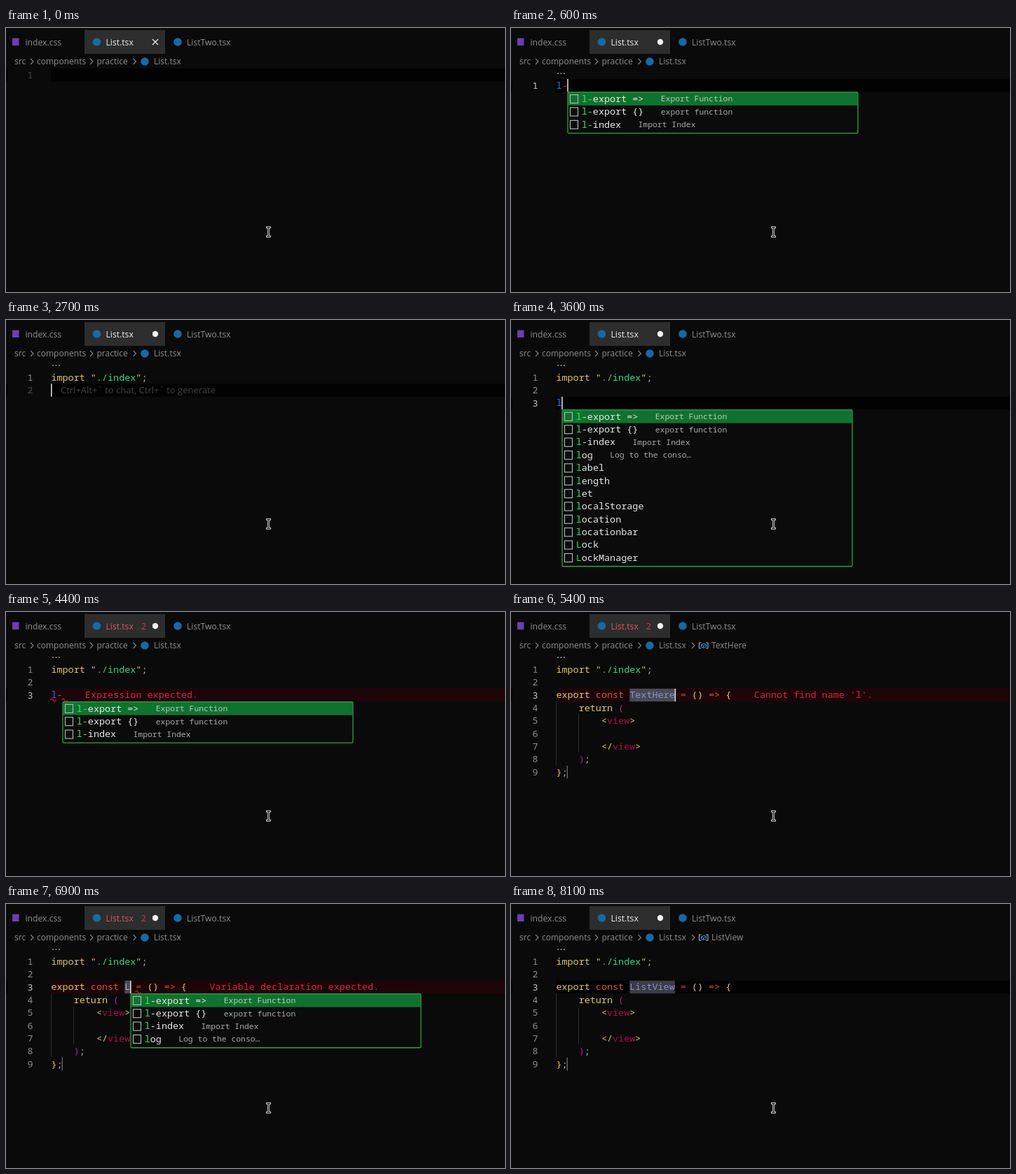
An HTML page that plays this animation: 712x378 px, repeating every 8200 ms.

```html
<!DOCTYPE html>
<html lang="en">
<head>
<meta charset="utf-8">
<title>Snippet typing</title>
<style>
  html, body { margin: 0; width: 100%; height: 100%; overflow: hidden; background: #0a0a0a; }
  svg { display: block; width: 712px; height: 378px; }
  text { white-space: pre; font: 12px "Open Sans", "Noto Sans", sans-serif; }
  .tab { font-size: 12.2px; }
  .code { font: 500 13.45px "Noto Sans Mono", "DejaVu Sans Mono", monospace; }
  .detail { font: 11.4px "Noto Sans Mono", "DejaVu Sans Mono", monospace; }
  .hint { font-size: 13px; }
</style>
</head>
<body>
<svg viewBox="0 0 712 378">
  <rect width="712" height="378" fill="#0a0a0a"/>
  <rect x="112" y="3" width="115" height="34" fill="#2d2d2d"/>
  <rect x="9" y="14.5" width="9.5" height="10.5" fill="#6a3fb0"/>
  <g fill="#1769a5">
    <circle cx="129.5" cy="20" r="5.8"/>
    <circle cx="245" cy="20" r="5.8"/>
    <circle cx="198" cy="48" r="5.8"/>
  </g>
  <g fill="#8f8f8f">
    <text x="27.5" y="24.5" class="tab">index.css</text>
    <text x="258" y="24.5" class="tab">ListTwo.tsx</text>
    <text x="12" y="52.3">src</text>
    <text x="44" y="52.3">components</text>
    <text x="129.5" y="52.3">practice</text>
    <text x="211" y="52.3">List.tsx</text>
  </g>
  <path d="M35 44l4 4-4 4M120 44l4 4-4 4M181.500 44l4 4-4 4" fill="none" stroke="#858585" stroke-width="1.1"/>
  <g id="editor"></g>
  <g fill="none">
    <path d="M371 285.500h7M374.500 285.500v13M371 298.500h7" stroke="#bdbdbd" stroke-width="3"/>
    <path d="M372 285.500h5M374.500 285.500v13M372 298.500h5" stroke="#1c1c1c"/>
  </g>
</svg>
<script>
const LOOP = 8200, LEFT = 64.4, CHAR = 8.07, ROW = 18.375;
const editor = document.getElementById('editor');

const COLORS = {
  y: '#dfc674', g: '#39d583', r: '#cf4038', o: '#d0573a', n: '#8d8bd2', b: '#3a70d2',
  m: '#a3248c', v: '#a90f49', w: '#b5b5a8', l: '#a8aaa4'
};

// Lines are lists of "colour:text" tokens.
const IMPORT = ['y:import "', 'g:./index', 'y:"', 'w:;'];
const BODY = [
  ['y:    return ', 'm:('],
  ['y:        <', 'v:view', 'y:>'],
  [],
  ['y:        </', 'v:view', 'y:>'],
  ['m:    )', 'w:;'],
  ['y:}', 'w:;']
];
const component = (name, color = 'n') => [
  IMPORT, [],
  ['y:export ', 'o:const ', color + ':' + name, 'r: = ', 'y:() ', 'o:=> ', 'y:{'],
  ...BODY
];

const SNIPPETS = [['l-export =>', 'Export Function'], ['l-export {}', 'export function'], ['l-index', 'Import Index']];
const LOG = ['log', 'Log to the conso…'];
const ALL = [...SNIPPETS, LOG, ...['label', 'length', 'let', 'localStorage', 'location', 'locationbar', 'Lock', 'LockManager'].map(s => [s, ''])];
const INDEX = [SNIPPETS[2]];
const EXPR = 'Expression expected.', CANNOT = "Cannot find name 'l'.", DECL = 'Variable declaration expected.';

const named = (name, extra) => ({ code: component(name), col: 13 + name.length, word: name.length, ...extra });

// Each entry changes part of the editor state from its time on.
const EVENTS = [
  [0, { code: [[]], line: 0, col: 0, caret: 0, lens: 0, dirty: 0, hint: 0, error: '', list: null, match: 0, word: 0, crumb: '', stop: 0, squiggles: [] }],
  [100, { caret: 1, hint: 1 }],
  [300, { code: [['b:l']], col: 1, hint: 0, lens: 1, dirty: 1, list: ALL, match: 1 }],
  [600, { code: [['b:l', 'r:-']], col: 2, list: SNIPPETS, match: 2 }],
  [900, { error: CANNOT, squiggles: [0] }],
  [1100, { error: EXPR, squiggles: [0, 2] }],
  [1200, { caret: 0 }],
  [1500, { caret: 1 }],
  [1700, { code: [['b:l', 'r:-', 'b:i']], col: 3, list: INDEX, match: 3 }],
  [1900, { code: [IMPORT], col: 17, list: null, squiggles: [] }],
  [2200, { code: [IMPORT, []], line: 1, col: 0, error: '', hint: 1 }],
  [2400, { caret: 0 }],
  [2700, { caret: 1 }],
  [3200, { code: [IMPORT, [], []], line: 2 }],
  [3400, { code: [IMPORT, [], ['b:l']], col: 1, hint: 0, list: ALL, match: 1 }],
  [3700, { code: [IMPORT, [], ['b:l', 'r:-']], col: 2, list: SNIPPETS, match: 2 }],
  [4200, { error: EXPR, squiggles: [0, 2], caret: 0 }],
  [4800, named('TextHere', { list: null, squiggles: [], stop: 1, caret: 1 })],
  [5100, { crumb: 'TextHere' }],
  [5200, { caret: 0 }],
  [5400, { caret: 1, error: CANNOT }],
  [5600, { error: '' }],
  [6000, { caret: 0 }],
  [6300, named('', { caret: 1 })],
  [6600, { error: DECL, squiggles: [14], crumb: '' }],
  [6800, { code: component('L', 'l'), col: 14, word: 1, list: [...SNIPPETS, LOG], match: 1, squiggles: [15] }],
  [7000, named('Li', { list: INDEX, squiggles: [] })],
  [7100, named('Lis', { list: null })],
  [7200, named('List')],
  [7400, named('ListV')],
  [7500, named('ListVi', { error: '' })],
  [7600, named('ListVie')],
  [7700, named('ListView')],
  [8000, { crumb: 'ListView' }],
  [8100, { caret: 0 }]
];

const escape = s => s.replace(/&/g, '&amp;').replace(/</g, '&lt;');
const text = (x, y, s, fill, cls = '') => `<text x="${x}" y="${y}" fill="${fill}" class="${cls}">${escape(s)}</text>`;
const rect = (x, y, w, h, fill, more = '') => `<rect x="${x}" y="${y}" width="${w}" height="${h}" fill="${fill}" ${more}/>`;
const stroke = (d, color, width = 1) => `<path d="${d}" fill="none" stroke="${color}" stroke-width="${width}"/>`;
const colX = col => LEFT + col * CHAR;

function codeLine(tokens, y) {
  const spans = tokens.map(t => `<tspan fill="${COLORS[t[0]]}">${escape(t.slice(2))}</tspan>`);
  return `<text x="${LEFT}" y="${y}" class="code">${spans.join('')}</text>`;
}

function popup(items, match, x, y) {
  const box = [x, y, 414, items.length * ROW + 3.5];
  let out = rect(...box, '#0b0b0b', 'rx="1.5"') + rect(x + .5, y + .5, 413, ROW, '#10722f');
  items.forEach(([label, detail], i) => {
    const mid = y + 9.6 + i * ROW;
    out += rect(x + 3.5, mid - 6, 11, 12, 'none', 'stroke="#b4bdb4" stroke-width="1.1"');
    out += `<text x="${x + 19.7}" y="${mid + 4.3}" class="code" fill="#e4e8e4"><tspan fill="#35e35c">${label.slice(0, match)}</tspan>${escape(label.slice(match))}</text>`;
    out += text(x + 44 + label.length * CHAR, mid + 3.8, detail, i ? '#a9a9a9' : '#b3cdb9', 'detail');
  });
  return out + rect(...box, 'none', 'rx="1.5" stroke="#2ea043" stroke-width="1.3"');
}

function header(s) {
  let out = text(142.5, 24.5, 'List.tsx', s.error ? '#dc5561' : '#f0f0f0', 'tab');
  if (s.error) out += text(193, 24.5, '2', '#c5434f', 'tab');
  out += s.dirty ? '<circle cx="213" cy="20" r="4.2" fill="#f4f4f4"/>'
                 : stroke('M209 16l8 8M217 16l-8 8', '#e8e8e8', 1.3);
  if (s.crumb) {
    out += stroke('M258 44l4 4-4 4', '#858585', 1.1);
    out += stroke('M271.500 44h-3v8h3M278 44h3v8h-3', '#a9b4bd', 1.1);
    out += stroke('M271.500 47l4-2 3 1.500v3l-4 2-3-1.500zM271.500 47l3 1.500 4-2M274.500 48.500v3', '#3f8fd0');
    out += text(286, 52.3, s.crumb, '#8f8f8f');
  }
  return out;
}

function draw(s) {
  const top = s.lens ? 82 : 67;
  const mid = i => top + i * ROW;
  const y = mid(s.line);
  const length = s.code[s.line].join('').length - 2 * s.code[s.line].length;
  let out = header(s) + rect(64, y - 9, 648, ROW, s.error ? '#1d0408' : '#020202') + rect(0, y - 9, 2, ROW, '#020202');

  if (s.lens) out += [67, 71.5, 76].map(x => `<circle cx="${x}" cy="65" r="1" fill="#999"/>`).join('');
  if (s.stop) out += stroke(`M64.500 ${mid(2) + 9}V${mid(7) + 9}M96.500 ${mid(3) + 9}V${mid(6) + 9}`, '#2b2b2b');
  if (s.word) out += rect(colX(13), y - 9, s.word * CHAR, ROW, s.crumb === 'ListView' ? '#3c3c44' : '#4a4a55');

  s.code.forEach((tokens, i) => {
    const active = i === s.line;
    out += text(30.5, mid(i) + 4.8, String(i + 1), active ? (s.hint || !s.dirty ? '#484848' : '#c4c4c4') : '#8c8c8c', 'code');
    out += codeLine(tokens, mid(i) + 4.6);
  });

  for (const col of s.squiggles)
    out += stroke(`M${colX(col) - 1} ${y + 7.5}q2-4 4 0t4 0`, '#c9242f', 1.1);
  if (s.error) out += text(colX(length + 4), y + 4.6, s.error, '#cf2940', 'code');
  if (s.hint) out += text(78, y + 4.8, 'Ctrl+Alt+` to chat, Ctrl+` to generate', '#434343', 'hint');
  if (s.stop) out += rect(79.7, mid(8) - 9, 1, ROW, '#8a8a8a');
  if (s.list) out += popup(s.list, s.match, Math.ceil(colX(s.col)), y + 10);
  if (s.caret) out += rect(colX(s.col) - .3, y - 9, 1.5, ROW, '#e6e6e6');
  editor.innerHTML = out;
}

let shown = -1;
function frame(now) {
  const t = now % LOOP;
  const step = EVENTS.filter(([at]) => at <= t).length;
  if (step !== shown) {
    shown = step;
    draw(Object.assign({}, ...EVENTS.slice(0, step).map(e => e[1])));
  }
  requestAnimationFrame(frame);
}
frame(performance.now());
</script>
</body>
</html>
```
